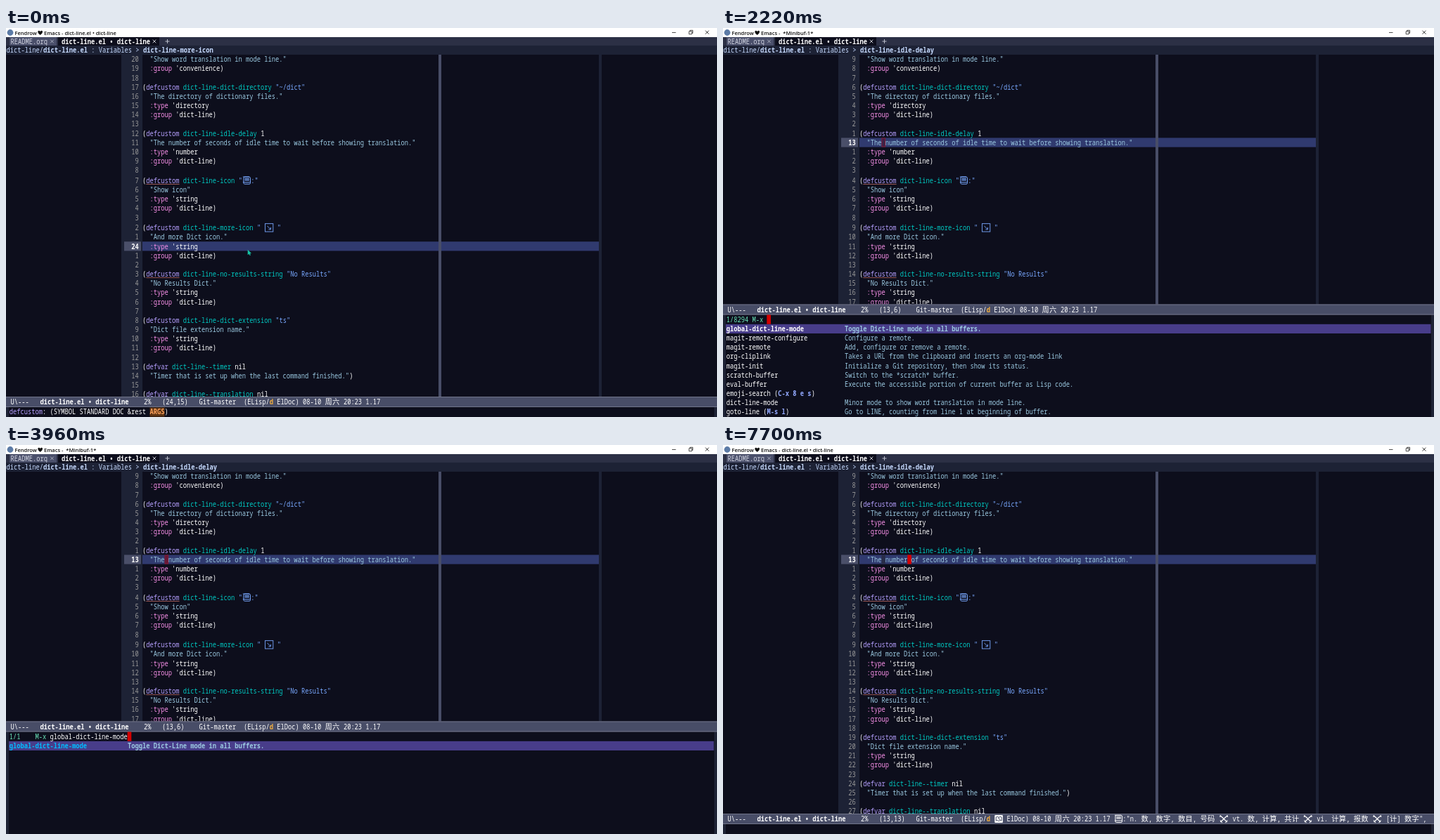
These frames come from a looping animation (1011 by 554 pixels, 8000 ms). An HTML page:

```html
<!DOCTYPE html>
<html lang="en">
<head>
<meta charset="utf-8">
<title>Dict-Line</title>
<style>
html, body { margin: 0; width: 100%; height: 100%; overflow: hidden; background: #0d0e1c; }
svg { display: block; width: 1011px; height: 554px; }
text { white-space: pre; }
.mono { font: 10.5px "Noto Sans Mono", "DejaVu Sans Mono", monospace; }
.han { font: 10.3px "Noto Sans CJK SC", "Noto Sans CJK", sans-serif; }
.title { font: 600 7.5px "Open Sans", "Noto Sans", sans-serif; fill: #111; }
.bold { font-weight: 700; }
</style>
</head>
<body>
<svg viewBox="0 0 1011 554">
  <g id="screen"></g>
  <path id="arrow" d="M0 0L0 7.4L1.8 5.9L3 8.2L4.2 7.6L3.1 5.4L5.3 5.1Z" fill="#16c5a6"/>
  <circle id="click" cx="228.3" cy="163.3" r="6" fill="#a4b000" fill-opacity=".82"/>
</svg>
<script>
const LOOP = 8000, CELL = 5.255, ROW = 13.17, CODE_X = 194, LIST_X = 4.8;
const NARROW = CELL / 6.3; // condensed cut of the 0.6em monospace face
const C = {
  bg: '#0d0e1c', dim: '#1d2235', bar: '#484d67', hl: '#303a6f', pick: '#483d8a', red: '#d40000',
  fg: '#ffffff', num: '#989898', key: '#b6a0ff', name: '#00c9c2', str: '#79a8ff',
  doc: '#9ac8e0', prop: '#f78fe7', head: '#c6daff', prompt: '#6ae4b9', match: '#00bcff', bind: '#93a9ff'
};

const CODE = `  "Show word translation in mode line."
  :group 'convenience)

(defcustom dict-line-dict-directory "~/dict"
  "The directory of dictionary files."
  :type 'directory
  :group 'dict-line)

(defcustom dict-line-idle-delay 1
  "The number of seconds of idle time to wait before showing translation."
  :type 'number
  :group 'dict-line)

(defcustom dict-line-icon "§:"
  "Show icon"
  :type 'string
  :group 'dict-line)

(defcustom dict-line-more-icon " ¤ "
  "And more Dict icon."
  :type 'string
  :group 'dict-line)

(defcustom dict-line-no-results-string "No Results"
  "No Results Dict."
  :type 'string
  :group 'dict-line)

(defcustom dict-line-dict-extension "ts"
  "Dict file extension name."
  :type 'string
  :group 'dict-line)

(defvar dict-line--timer nil
  "Timer that is set up when the last command finished.")

(defvar dict-line--translation nil`.split('\n');

const rows = s => s.trim().split('\n').map(r => r.split('|'));
const FIRST = 'global-dict-line-mode|Toggle Dict-Line mode in all buffers.\n';
const GLOBALS = `global-sideline-mode|Toggle Sideline mode in all buffers.
global-fendrow-idle-run-mode
global-blamer-mode|Toggle Blamer mode in all buffers.
`;
const EDE = 'global-ede-mode|Toggle global EDE (Emacs Development Environment) mode.\n';
const SET_KEY = 'global-set-key|Give KEY a global binding as COMMAND.\n';
const MAGIT = `magit-remote-configure|Configure a remote.
magit-remote|Add, configure or remove a remote.
org-cliplink|Takes a URL from the clipboard and inserts an org-mode link
magit-init|Initialize a Git repository, then show its status.
`;
const GOTO = 'goto-line|Go to LINE, counting from line 1 at beginning of buffer.|M-s l\n';
const LISTS = {
  all: rows(FIRST + MAGIT + `scratch-buffer|Switch to the *scratch* buffer.
eval-buffer|Execute the accessible portion of current buffer as Lisp code.
emoji-search||C-x 8 e s
dict-line-mode|Minor mode to show word translation in mode line.
` + GOTO),
  g: rows(FIRST + MAGIT + GOTO + GLOBALS + SET_KEY),
  glo: rows(FIRST + GLOBALS + `eglot|Start LSP server for PROJECT's buffers under MANAGED-MAJOR-MODES.
eglot-format
eglot-rename
` + SET_KEY + 'eglot-reconnect\n' + EDE),
  glob: rows(FIRST + GLOBALS + SET_KEY + EDE + `global-hl-line-mode|Toggle Hl-Line mode in all buffers.
global-font-lock-mode|Toggle Font-Lock mode in all buffers.
global-auto-revert-mode|Toggle Global Auto-Revert Mode.
global-visual-line-mode|Toggle Visual-Line mode in all buffers.`),
  one: rows(FIRST)
};
// start time, typed text, candidate list, match count
const TYPING = [
  [2220, '', 'all', 8294], [3090, 'g', 'g', 2512], [3250, 'gl', 'glo', 148], [3450, 'glo', 'glo', 90],
  [3530, 'glob', 'glob', 82], [3600, 'globa', 'glob', 82],
  [3910, 'global-dict-line-mode', 'glob', 82], [3960, 'global-dict-line-mode', 'one', 1]
];
const NUMBER = '§:"n. 数, 数字, 数目, 号码 † vt. 数, 计算, 共计 † vi. 计算, 报数 † [计] 数字",';
const ARTICLE = '§:"art. 那",';

const $ = id => document.getElementById(id);
const esc = s => s.replace(/&/g, '&amp;').replace(/</g, '&lt;').replace(/>/g, '&gt;');
const rect = (x, y, w, h, fill, more = '') => `<rect x="${x}" y="${y}" width="${w}" height="${h}" fill="${fill}" ${more}/>`;
const path = (d, color, w = 1, fill = 'none') => `<path d="${d}" stroke="${color}" stroke-width="${w}" fill="${fill}"/>`;
const title = (x, s) => `<text class="title" x="${x}" y="9.6">${s}</text>`;
const cross = (x, y, r, color) => path(`M${x - r} ${y - r}l${2 * r} ${2 * r}m0 ${-2 * r}l${-2 * r} ${2 * r}`, color, .9);

const ICONS = {
  '§': [12.3, c => rect(2, -5, 9.6, 10, 'none', `rx="1.5" stroke="${c}"`) +
    path('M1 -5.2H10M3.5 -2.6H10M3.5 -.6H10M1 2.5H11', c, 1.1)],
  '¤': [13, c => rect(1, -5.8, 11.4, 11.4, 'none', `stroke="${c}" stroke-width=".9"`) +
    path('M4 -2.6L9 2.4M9 -.6V2.4H6', c, .9)],
  '†': [14.5, c => path('M2 -5L12 4.5M12.5 -5L2.5 4.5M2 2L5 5.5M12.5 2L9.5 5.5M2 -5V-2.5M12.5 -5V-2.5', c, 1.1)],
  '¶': [13, c => rect(1, -5.5, 11.6, 11, c, 'rx="1"') +
    path('M3 -2.5Q5 -4 6.8 -2.2Q9 -4 10.8 -2.5V2.5Q9 1.5 6.8 3Q5 1.5 3 2.5ZM6.8 -2.2V0L9 1', C.bar, 1)]
};

// parts: [text, color, bold?]; y is the middle of the row
function write(x, y, parts) {
  let out = '';
  for (const [str, color, bold] of parts) {
    for (const run of str.match(/[§¤†¶]|[\u4e00-\u9fff]|[^§¤†¶\u4e00-\u9fff]+/g) || []) {
      const icon = ICONS[run], han = run >= '\u4e00' && run <= '\u9fff';
      if (icon) out += `<g transform="translate(${x} ${y})">${icon[1](color)}</g>`;
      else if (han) out += `<text class="han" x="${x}" y="${y + 3.8}" fill="${color}">${run}</text>`;
      else if (run.trim()) out += `<text class="mono${bold ? ' bold' : ''}" fill="${color}" transform="translate(${x} ${y + 3.7}) scale(${NARROW} 1)">${esc(run)}</text>`;
      x += icon ? icon[0] : CELL * (han ? 2 : run.length);
    }
  }
  return out;
}

const codeY = i => 44.5 + ROW * i + (i > 17 ? 2.9 : i > 12 ? 1.5 : 0);

function paint(line) {
  const tokens = line.match(/"[^"]*"|:\w+|def(?:custom|var)|dict-line-[\w-]+|[^":d]+|./g) || [];
  return tokens.map(s => [s,
    s[0] === '"' ? (line[0] === ' ' ? C.doc : C.str) :
    s[0] === ':' ? C.prop : /^def/.test(s) ? C.key : /^dict-line-/.test(s) ? C.name : C.fg]);
}

function frameTop(s) {
  const file = 'dict-line.el • dict-line';
  return rect(0, 0, 1011, 13, '#fff') + '<circle cx="6" cy="6.5" r="4.4" fill="#5c7ba6"/>' +
    title(12.5, 'Fendrow') + path('M48.7 10C42.7 6 46.1 1.8 48.7 5C51.3 1.8 54.7 6 48.7 10Z', 'none', 0, '#111') +
    title(54, 'Emacs - ' + (s.mini ? ' *Minibuf-1*' : file)) +
    path('M947 6.5h5.5M971.2 4.8h4v4h-4zM972.6 4.6v-1.3h4v4h-1.2', '#222', .8) + cross(997, 6.2, 2.5, '#222') +
    rect(0, 13, 1011, 12, '#2c3045') + rect(5, 13, 67, 12, '#4a4f6a') + rect(74, 13, 144, 12, C.bg) +
    write(6.5, 19, [['README.org', '#d0d3e0']]) + cross(65.5, 19, 2.3, '#b4b8c8') +
    write(79, 19, [[file, C.fg, 1]]) + cross(211, 19, 2.3, '#d8d8e0') + path('M226.5 19h6m-3-3v6', '#c8cad6', .9) +
    rect(0, 25, 1011, 13, C.dim) +
    write(.5, 31.3, [['dict-line/', C.head], ['dict-line.el', C.head, 1], [' : Variables > ', C.head],
      [s.row === 20 ? 'dict-line-more-icon' : 'dict-line-idle-delay', C.head, 1]]);
}

function editor(s) {
  let out = rect(164, 38, 30, 488, C.dim) + rect(843, 38, 4, 488, C.dim);
  const y = codeY(s.row) - 6.6;
  out += rect(168, y, 24, 13.2, '#4a4f69') + rect(194, y, 649, 13.2, C.hl) + rect(615, 38, 4, 488, C.bar);
  if (s.mark) out += rect(225.5, y, CELL, 13.2, '#292d49');
  const cx = CODE_X + CELL * s.col;
  if (s.cursor === 'block') out += rect(cx, y, CELL + .3, 13.2, C.red);
  if (s.cursor === 'idle') out += rect(cx + .5, y + .5, CELL - .7, 12.2, s.typed ? '#651b38' : '#3a2348', 'stroke="#8a1530" stroke-width=".9"');
  CODE.forEach((line, i) => {
    const here = i === s.row, n = String(here ? i + 4 : Math.abs(i - s.row)), cy = codeY(i);
    out += write(188.8 - CELL * n.length, cy, [[n, here ? C.fg : C.num, here]]) + write(CODE_X, cy, paint(line));
    if (i === 13 || i === 23) out += path(`M199.3 ${cy + 5.3}h47.3`, '#bb6a62', .8);
  });
  return out;
}

function modeLine(s, top) {
  const y = top + 7.5;
  const put = (x, ...p) => write(x, y, p);
  return rect(0, top, 1011, 15, C.bar) + path(`M0 ${top + .5}H1011M0 ${top + 14.5}H1011`, '#7b7f94', .8) +
    put(6.5, ['U\\---', C.fg]) + put(48.5, ['dict-line.el • dict-line', C.fg, 1]) + put(196, ['2%', C.fg]) +
    put(222, [s.pos, C.fg]) + put(274.5, ['Git-master', C.fg]) +
    put(338, ['(ELisp/', C.fg], ['d', '#f5b03e', 1], [(s.lighter ? ' ¶' : '') + ' ElDoc) 08-10 周六 20:23 1.17 ' + s.gloss, C.fg]);
}

function matched(name, typed, bold) {
  const at = typed ? name.indexOf(typed) : -1;
  if (at < 0) return [[name, C.fg, bold]];
  return [[name.slice(0, at), C.fg, bold], [typed, C.match, 1], [name.slice(at + typed.length), C.fg, bold]];
}

function minibuffer(s) {
  let out = rect(LIST_X - .8, 421.8, 1002.5, 13.2, C.pick);
  out += write(LIST_X, 415, [[('1/' + s.count).padEnd(7) + 'M-x ', C.prompt], [s.typed, C.fg]]);
  LISTS[s.list].forEach(([name, doc, bind], i) => {
    const y = 415 + ROW * (i + 1), parts = matched(name, s.typed, !i);
    if (bind) parts.push([' (', C.fg], [bind, C.bind, 1], [')', C.fg]);
    out += write(LIST_X, y, parts) + (doc ? write(LIST_X + 32 * CELL, y, [[doc, C.doc, !i]]) : '');
  });
  if (s.miniCol >= 0) out += rect(LIST_X + CELL * s.miniCol - .3, 408.5, CELL + .4, 13.2, C.red);
  return out;
}

function echo(kind) {
  if (kind === 'mode') return write(LIST_X, 546.7, [['Global Dict-Line mode enabled', C.fg]]);
  if (kind !== 'args') return '';
  return rect(LIST_X + 38 * CELL, 540.5, 4 * CELL, 13, '#5a3213') +
    write(LIST_X, 546.7, [['defcustom', C.key], [': (SYMBOL STANDARD DOC &rest ', C.fg], ['ARGS', '#ffa25c', 1], [')', C.fg]]);
}

const within = (t, ...spans) => spans.some(([a, b]) => t >= a && t < b);

function stateAt(t) {
  const open = within(t, [2220, 5350]);
  const [, typed, list, count] = TYPING.filter(k => t >= k[0]).pop() || TYPING[0];
  const moved = t >= 6570;
  return {
    open, typed: open ? typed : '', list, count,
    mini: within(t, [2220, 5310]),
    miniCol: within(t, [2220, 2720], [3090, 4480], [4950, 5310]) ? 11 + typed.length : within(t, [5310, 5350]) ? 0 : -1,
    row: t < 1160 ? 20 : 9,
    col: moved ? 13 : 6,
    pos: t < 1160 ? '(24,15)' : moved ? '(13,13)' : '(13,6)',
    cursor: open ? 'idle' : within(t, [1160, 1730], [5350, 5840], [6390, 7080], [7700, LOOP]) ? 'block' : '',
    mark: t >= 7700,
    lighter: t >= 5350,
    gloss: t < 5350 ? '' : within(t, [6390, 7700]) ? ARTICLE : NUMBER,
    echo: t < 1160 ? 'args' : within(t, [5330, 6570]) ? 'mode' : ''
  };
}

function draw(s) {
  const top = s.open ? 393.5 : 525, end = top + 15;
  return rect(0, 0, 1011, 554, C.bg) + editor(s) + frameTop(s) +
    rect(0, top, 1011, 554 - top, C.bg) + rect(0, end, 4, 554 - end, C.dim) + rect(1007, end, 4, 554 - end, C.dim) +
    modeLine(s, top) + (s.open ? minibuffer(s) : '') + echo(s.echo);
}

let shown = '';
function render(t) {
  const s = stateAt(t), key = JSON.stringify(s);
  if (key !== shown) { $('screen').innerHTML = draw(s); shown = key; }
  const p = Math.min(1, Math.max(0, (t - 60) / 820)), e = p * p * (3 - 2 * p);
  $('arrow').setAttribute('transform', `translate(${343.7 - 115 * e} ${315.8 - 152 * e})`);
  $('arrow').style.display = t < 1060 ? '' : 'none';
  $('click').style.display = within(t, [1060, 1240]) ? '' : 'none';
}

function tick() {
  render(performance.now() % LOOP);
  requestAnimationFrame(tick);
}
tick();
</script>
</body>
</html>
```
